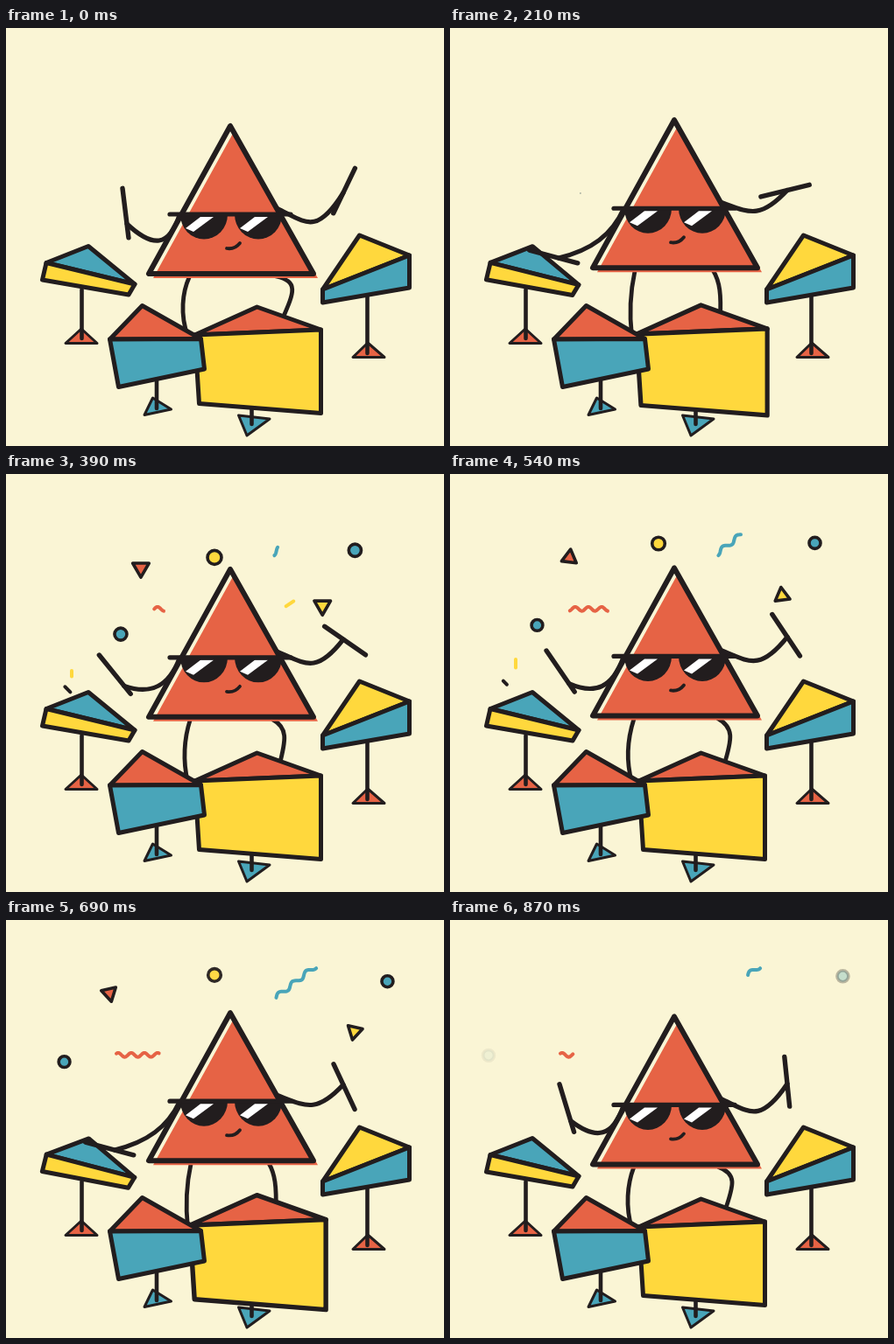
Write an HTML page with a canvas that moves like this. It is 500 by 478 pixels and loops after 900 ms.

```html
<!DOCTYPE html>
<html lang="en">
<head>
<meta charset="utf-8">
<title>Triangle drummer</title>
<style>
  html, body { margin: 0; width: 100%; height: 100%; overflow: hidden; background: #faf5d5; }
  canvas { display: block; width: 100vw; height: 100vh; }
</style>
</head>
<body>
<canvas id="stage"></canvas>
<script>
const W = 500, H = 478, LOOP = 900, BEAT = 450, STEP = 30;
const PAPER = '#faf5d5', INK = '#221d1e', RED = '#e66345', TEAL = '#49a5b9', YELLOW = '#ffd83d';
const { PI, sin, cos, exp, max, min } = Math;
const canvas = document.getElementById('stage');
const ctx = canvas.getContext('2d');

const clamp = v => max(0, min(1, v));
const ramp = (t, from, to) => clamp((t - from) / (to - from));
const smooth = v => v * v * (3 - 2 * v);
const mix = (a, b, v) => a + (b - a) * v;
const backOut = v => 1 + 2.7 * (v - 1) ** 3 + 1.7 * (v - 1) ** 2;
const rad = degrees => degrees * PI / 180;

// The pose within one beat; b runs from 0 to BEAT.
function pose(b) {
  const u = b / BEAT;
  const hit = exp(-(((b - 245) / 40) ** 2));
  return {
    hit,
    dy: -7.7 * sin(PI * u) + 1.9 * hit,
    knee: 1.1 * (1 - Math.abs(sin(PI * (u - .05)))),
    strike: b < 300 ? ramp(b, 0, 122) ** 3 : 1 - smooth(ramp(b, 325, BEAT))
  };
}

// Ribbons grow along a path, then their tail catches up.
const ribbons = [
  { color: RED, length: 54, grow: [340, 590], leave: [500, 910],
    at: s => [180 - s, 154.3 - 2.4 * cos(2 * PI * (s - 7) / 15)] },
  { color: TEAL, length: 61, grow: [340, 690], leave: [540, 905],
    at: s => {
      const off = 1.2 - 2.6 * cos(2 * PI * s / 20);
      return [305.5 + .784 * s - .62 * off, 92 - .62 * s - .784 * off];
    } },
  { color: YELLOW, length: 30, grow: [270, 480], leave: [250, 480], at: s => [314 + .83 * s, 155 - .555 * s] },
  { color: YELLOW, length: 26, grow: [310, 610], leave: [310, 620], at: s => [75, 232 - s] },
  { color: INK, length: 24, grow: [215, 600], leave: [215, 600], at: s => [75 - .7 * s, 251 - .71 * s] }
];

const bits = [
  { color: TEAL, from: [149, 189], to: [43, 154.5], r: 6.4, gone: 875 },
  { color: TEAL, from: [388, 92], to: [449, 64], r: 6.5, gone: 895, delay: 8 },
  { color: YELLOW, from: [238, 104.5], to: [238, 51], r: 7.3, gone: 770, delay: 8 },
  { color: RED, from: [164, 114], to: [105, 75], r: 9.8, gone: 790, spin: 1, delay: 8 },
  { color: YELLOW, from: [351, 157], to: [411, 119], r: 9.8, gone: 790, spin: -1, delay: 8 }
];

function paint(fill, width) {
  if (fill) { ctx.fillStyle = fill; ctx.fill(); }
  if (width) { ctx.strokeStyle = INK; ctx.lineWidth = width; ctx.stroke(); }
}

function poly(points, fill, width) {
  ctx.beginPath();
  points.forEach(p => ctx.lineTo(...p));
  ctx.closePath();
  paint(fill, width);
}

function line(x0, y0, x1, y1, width) {
  ctx.beginPath();
  ctx.moveTo(x0, y0);
  ctx.lineTo(x1, y1);
  paint(null, width);
}

function curve(x, y, c, width) {
  ctx.beginPath();
  ctx.moveTo(x, y);
  ctx.bezierCurveTo(...c);
  paint(null, width);
}

function about(x, y, scale, degrees, draw) {
  ctx.save();
  ctx.translate(x, y);
  ctx.scale(scale, scale);
  ctx.rotate(rad(degrees));
  ctx.translate(-x, -y);
  draw();
  ctx.restore();
}

// A stick through the hand at x, y; slide moves it towards its tip.
function stick(x, y, degrees, slide) {
  const dx = -cos(rad(degrees)), dy = -sin(rad(degrees)), half = 28.5;
  const front = half + slide, back = half - slide;
  line(x + dx * front, y + dy * front, x - dx * back, y - dy * back, 5.4);
}

function stand(x, top, bottom, foot, fill) {
  poly(foot, fill, 3);
  line(x, top, x, bottom, 4.6);
}

function legs({ dy, knee }) {
  curve(211 - 2 * knee, 285 + dy, [206 - 5 * knee, 302, 205 - 7 * knee, 328, 207.5, 352], 4.8);
  curve(300 + 9 * knee, 284 + dy, [307 + 29 * knee, 290, 309 + 22 * knee, 305 - 4 * knee, 308 + 8 * knee, 333], 4.8);
}

function body({ dy }) {
  ctx.save();
  ctx.translate(0, dy);
  const shape = [[256, 112], [163, 281], [351, 281]];
  poly(shape, PAPER);
  poly(shape.map(([x, y]) => [x + 5, y + 5]), RED);
  poly(shape, null, 6);
  for (const x of [226, 288]) {
    ctx.beginPath();
    ctx.ellipse(x, 213, 27, 28.5, 0, 0, PI);
    paint(INK);
    poly([[x - 4, 216], [x + 11, 216], [x - 12, 233], [x - 21, 229]], '#fff');
  }
  line(187, 213, 325, 213, 5.2);
  ctx.beginPath();
  ctx.moveTo(252, 252);
  ctx.quadraticCurveTo(261, 253.5, 267, 246);
  paint(null, 3.8);
  ctx.restore();
}

function leftHand(strike) {
  return [138 - 14 * strike ** 2, 224 + 39 * strike];
}

function arms(t, { dy, strike: k }) {
  curve(198, 214 + dy, [186 - k, 250 - 14 * k, 168 - 6 * k, 252 + 2 * k, ...leftHand(k)], 5.2);
  const twirl = 115.6 + 1.2 * t - 21.6 * sin(2 * PI * t / LOOP);
  const y = 187.5 - 2 * cos(rad(twirl));
  curve(309, 206 + dy, [342, 222 + 1.6 * dy, 354, 238 + 2.8 * dy, 385, y], 5.2);
  stick(385, y, twirl, 2.5);
}

function kit({ hit }) {
  stand(86.5, 299, 355, [[86, 344], [68, 360.5], [104, 360.5]], RED);
  about(70, 280, 1, hit, () => {
    poly([[46, 268.5], [94, 249.5], [147, 293]], TEAL, 5);
    poly([[46, 268.5], [147, 293], [140, 305], [41.5, 288]], YELLOW, 5);
  });
  stand(412.5, 306, 372, [[413, 360], [396, 376.5], [432, 376.5]], RED);
  poly([[403.5, 237], [460.5, 260], [361.5, 299]], YELLOW, 5);
  poly([[361.5, 299], [460.5, 260], [460.5, 297], [361.5, 314]], TEAL, 5);
  stand(280.5, 434, 453, [[265.5, 443], [301, 447], [275, 466]], TEAL);
  about(288, 375, 1 + .08 * hit, 0, () => {
    poly([[286.5, 319], [215.5, 351], [359.5, 345]], RED, 5);
    poly([[215.5, 351], [359.5, 345], [359.5, 440.5], [220.5, 429.5]], YELLOW, 5);
  });
  stand(172, 403, 435, [[167.5, 423], [158, 442.5], [188.5, 436]], TEAL);
  poly([[155.5, 317.5], [118.5, 356], [222.5, 355.5]], RED, 5);
  poly([[118.5, 356], [222.5, 355.5], [226.5, 390], [128.5, 410.5]], TEAL, 5);
}

function drawRibbon(t, { color, length, grow, leave, at }) {
  const head = length * ramp(t, ...grow), tail = length * ramp(t, ...leave) ** 3;
  if (head - tail < .3) return;
  ctx.beginPath();
  for (let i = 0; i <= 40; i++) ctx.lineTo(...at(mix(tail, head, i / 40)));
  ctx.strokeStyle = color;
  ctx.lineWidth = 4;
  ctx.stroke();
}

function drawBit(t, { color, from, to, r, gone, spin, delay = 0 }) {
  const size = backOut(ramp(t - delay, 205, 540));
  const alpha = 1 - ramp(t, gone - 85, gone);
  if (size < .01 || !alpha) return;
  const p = (1 - cos(PI * ramp(t, 195, 915))) / 2;
  const x = mix(from[0], to[0], p), y = mix(from[1], to[1], p);
  const width = 3.6 * min(1, size);
  ctx.globalAlpha = alpha;
  if (spin) {
    const v = (t - 390) / 150, turn = spin * (80.5 * v - 13.5 * v * v);
    const corners = [90, 210, 330].map(d => {
      const a = rad(d + turn);
      return [x + r * size * cos(a), y + r * size * sin(a)];
    });
    poly(corners, color, width);
  } else {
    ctx.beginPath();
    ctx.arc(x, y, r * size, 0, 2 * PI);
    paint(color, width);
  }
  ctx.globalAlpha = 1;
}

function draw(t) {
  const ratio = window.devicePixelRatio || 1;
  const w = Math.round(innerWidth * ratio), h = Math.round(innerHeight * ratio);
  if (canvas.width !== w || canvas.height !== h) { canvas.width = w; canvas.height = h; }
  ctx.setTransform(w / W, 0, 0, h / H, 0, 0);
  ctx.lineCap = ctx.lineJoin = 'round';
  ctx.fillStyle = PAPER;
  ctx.fillRect(0, 0, W, H);
  const now = pose(t % BEAT), k = now.strike;
  legs(now);
  body(now);
  arms(t, now);
  kit(now);
  stick(...leftHand(k), 83 - 68 * k, 12.5 - 6.5 * k + 30 * k * (1 - k));
  ribbons.forEach(r => drawRibbon(t, r));
  bits.forEach(b => drawBit(t, b));
}

const start = performance.now();
function tick() {
  const t = (performance.now() - start) % LOOP;
  draw(Math.floor(t / STEP) * STEP);
  requestAnimationFrame(tick);
}
tick();
</script>
</body>
</html>
```
